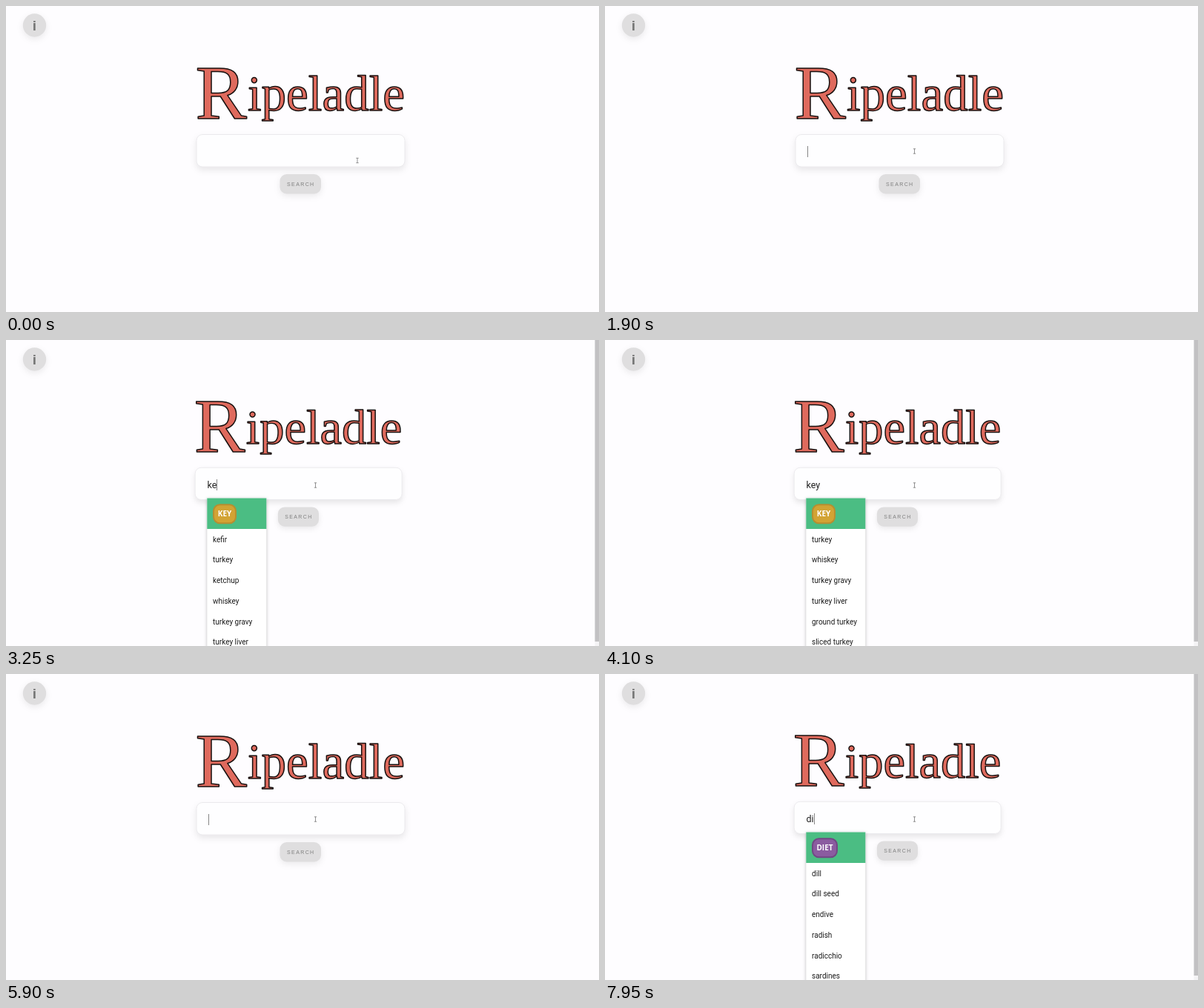
Animation of 800x413 px, one loop 8000 ms. Source, as an HTML page:

```html
<!DOCTYPE html>
<html lang="en">
<head>
<meta charset="utf-8">
<title>Recipe search</title>
<style>
  html, body { margin: 0; width: 100%; height: 100%; overflow: hidden; background: #fefdff; }
  svg { display: block; width: 800px; height: 413px; }
  .logo { font-family: "Liberation Serif", serif; fill: #df6a5d; stroke: #17100f; stroke-width: 1.5; stroke-linejoin: round; }
  .pill { fill: #dfdedf; filter: drop-shadow(0 3px 4px rgba(0, 0, 0, .08)); }
  .field { fill: #fefeff; stroke: #ebeaed; filter: drop-shadow(0 4px 4px rgba(0, 0, 0, .09)); }
  .info { font: 700 19px "Liberation Sans", sans-serif; fill: #757575; text-anchor: middle; }
  .search { font: 7px "Liberation Sans", sans-serif; letter-spacing: 1.4px; fill: #808080; }
  .query { font: 12.5px Roboto, sans-serif; fill: #222; }
  .item { font: 10px Roboto, sans-serif; fill: #1c1c1c; }
  .tag text { font: 700 10px "Open Sans", sans-serif; fill: #fff; text-anchor: middle; }
  .panel { fill: #fff; filter: drop-shadow(0 1px 2px rgba(0, 0, 0, .28)); }
</style>
</head>
<body>
<svg viewBox="0 0 800 413">
  <g id="page">
    <g class="logo">
      <text x="255.5" y="152" font-size="104">R</text>
      <text x="326" y="141" font-size="67">ipeladle</text>
    </g>
    <rect id="field" class="field" x="257" y="173.5" width="281" rx="8"/>
    <g id="button">
      <rect class="pill" x="369.5" y="227" width="55.5" height="26.5" rx="9"/>
      <text class="search" x="379" y="242.8">SEARCH</text>
    </g>
  </g>
  <circle class="pill" cx="38.5" cy="26" r="15.7"/>
  <text class="info" x="38.3" y="33">i</text>

  <g id="chip" class="tag">
    <path d="M307.3 190.3V215.3H286Q277 215.3 277 206V199Q277 190.3 286 190.3Z" fill="#d2a334" stroke="#b78e30" stroke-width="1.8"/>
    <text x="292" y="206.6">KEY</text>
  </g>

  <g id="menu">
    <rect class="panel" x="271.3" y="213.5" width="80" height="220"/>
    <rect x="271.3" y="213.5" width="80" height="41.5" fill="#4bbd83"/>
    <g class="tag">
      <rect id="badge" x="280" y="222.3" height="25" rx="8.5" stroke-width="2"/>
      <text id="badgeText" y="238.4"></text>
    </g>
    <g id="items"></g>
    <rect x="794.5" width="5.5" height="413" fill="#f4f3f5"/>
    <rect x="794.5" width="5.5" height="407" fill="#c2c1c3"/>
  </g>

  <text id="query" class="query" x="271.5" y="200"></text>
  <rect id="caret" width="1" height="15" fill="#858585"/>
  <path id="pointer" d="M-1.7 -3.2H1.7M0 -3.2V3.2M-1.7 3.2H1.7" fill="none" stroke="#666" stroke-width=".7"/>
</svg>
<script>
const LOOP = 8000, BLINK = 500;
const $ = id => document.getElementById(id);
const GOLD = { label: "KEY", fill: "#d2a334", stroke: "#b78e30", width: 30 };
const PURPLE = { label: "DIET", fill: "#8b5ca0", stroke: "#714884", width: 33 };

// Each step holds until the next one; the caret blink restarts with it.
const steps = [
  { at: 0, blur: true },
  { at: 450 },
  { at: 2550, query: "k", badge: GOLD, list: ["kale", "kiwi", "kavuno", "ketchup", "kumquat", "kohlrabi"] },
  { at: 2950, query: "ke", badge: GOLD, list: ["kefir", "turkey", "ketchup", "whiskey", "turkey gravy", "turkey liver"] },
  { at: 3400, query: "key", badge: GOLD, list: ["turkey", "whiskey", "turkey gravy", "turkey liver", "ground turkey", "sliced turkey"] },
  { at: 4150, chip: true },
  { at: 5100 },
  { at: 5550 },
  { at: 7300, query: "d", badge: PURPLE, list: ["dill", "date", "duck", "daikon", "durian", "dill seed"] },
  { at: 7800, query: "di", badge: PURPLE, list: ["dill", "dill seed", "endive", "radish", "radicchio", "sardines"] }
];

const show = (id, on) => $(id).style.display = on ? "" : "none";
const set = (id, attrs) => {
  for (const name in attrs) $(id).setAttribute(name, attrs[name]);
};

function applyStep({ query = "", list, badge, chip }) {
  const extra = chip ? 17.5 : 0;
  set("page", { transform: `scale(${list ? 0.9929 : 1})` });
  set("field", { height: 43.5 + extra });
  set("button", { transform: `translate(0 ${extra})` });
  show("chip", chip);
  show("menu", list);
  $("query").textContent = query;
  if (list) {
    const { label, fill, stroke, width } = badge;
    set("badge", { fill, stroke, width });
    set("badgeText", { x: 280 + width / 2 });
    $("badgeText").textContent = label;
    $("items").innerHTML = list.map((name, i) =>
      `<text class="item" x="279" y="${272.6 + i * 27.75}">${name}</text>`).join("");
  }
  const caretX = chip ? 312 : query ? 271.5 + $("query").getComputedTextLength() : 273;
  set("caret", { x: Math.round(caretX), y: query ? 188 : 189 });
}

let current;
function draw(time) {
  const step = steps.findLast(s => s.at <= time);
  if (step !== current) applyStep(current = step);
  show("caret", !step.blur && Math.floor((time - step.at) / BLINK) % 2 === 0);

  const p = Math.min(1, Math.max(0, (time - 50) / 400));
  const eased = p * p * (3 - 2 * p);
  set("pointer", { transform: `translate(${474 - 56.5 * eased} ${208.5 - 12.5 * eased})` });
}

const start = performance.now();
function tick() {
  draw((performance.now() - start) % LOOP);
  requestAnimationFrame(tick);
}
tick();
</script>
</body>
</html>
```
